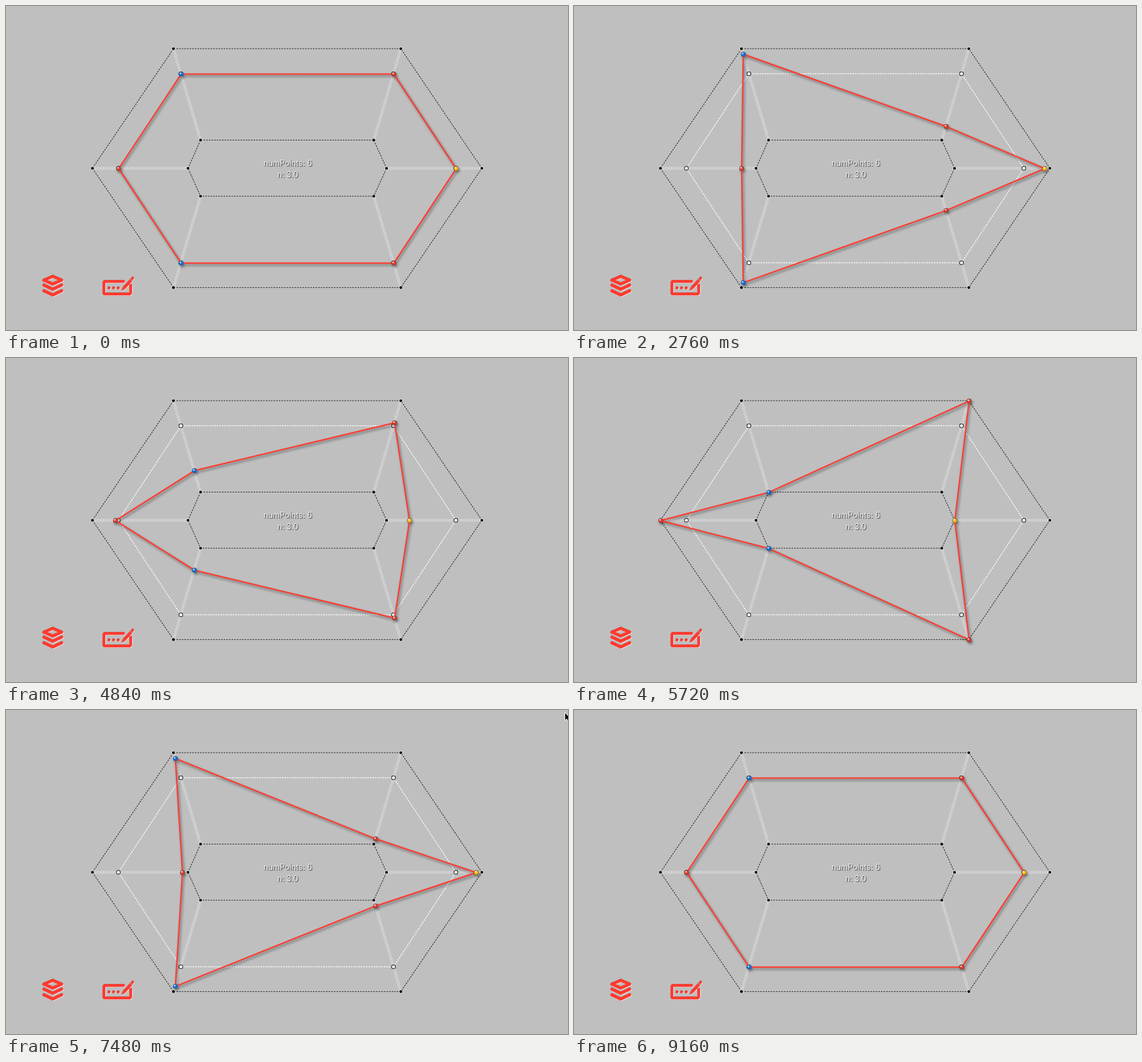
Write an HTML page that moves like this. It is 985x569 px and loops after 9280 ms.

```html
<!DOCTYPE html>
<html lang="en">
<head>
<meta charset="utf-8">
<title>Zig-zag polygon</title>
<style>
  html, body { margin: 0; width: 100%; height: 100%; overflow: hidden; background: #bfbfbf; }
  svg { display: block; width: 985px; height: 569px; }

  .rays { stroke: #e9e9e9; stroke-width: 5; stroke-dasharray: 1 2; fill: none; }
  .bounds { stroke: #1c1c1c; stroke-width: 1.1; stroke-dasharray: 2.8 1.8; fill: none; }
  .rest { stroke: #fff; stroke-width: 1.5; stroke-dasharray: 2.6 1.8; fill: none; }
  .pins { fill: #000; stroke: #ececec; stroke-width: 1; }
  .holes { fill: #fff; stroke: #333; stroke-width: 1.3; }

  .shape { translate: .5px .5px; filter: drop-shadow(2.5px 3.5px 2.2px rgba(0, 0, 0, .46)); }
  .line {
    fill: none; stroke: #fb3d32; stroke-width: 2.5; stroke-linejoin: round;
    animation: line 9280ms infinite;
  }
  .even { animation: even 9280ms infinite; }
  .odd { animation: odd 9280ms infinite; }
  .line, .even, .odd { animation-timing-function: ease-out; }
  .red { color: #e23a2d; }
  .blue { color: #0b73e6; }
  .gold { color: #ffb60a; }

  /* rest, zig, zag, zig, rest */
  @keyframes line {
    0%, 15.89%, 93.86%, 100% { d: path("M788.5 285L679.2 119L306.5 119L197 285L306.5 451L679.2 451Z"); }
    38.79%, 38.94%, 85.1% { d: path("M834 285L644.5 235.5L293.5 75L319 285L293.5 494.5L644.5 334Z"); }
    61.91%, 62.31% { d: path("M667 285L692 75L341 235.5L151.5 285L341 334L692 494.5Z"); }
  }
  @keyframes even {
    0%, 15.89%, 93.86%, 100% { translate: var(--rest); }
    38.79%, 38.94%, 85.1% { translate: var(--out); }
    61.91%, 62.31% { translate: var(--in); }
  }
  @keyframes odd {
    0%, 15.89%, 93.86%, 100% { translate: var(--rest); }
    38.79%, 38.94%, 85.1% { translate: var(--in); }
    61.91%, 62.31% { translate: var(--out); }
  }

  .v0 { --in: 667px 285px; --rest: 788.5px 285px; --out: 834px 285px; }
  .v1 { --in: 644.5px 235.5px; --rest: 679.2px 119px; --out: 692px 75px; }
  .v2 { --in: 341px 235.5px; --rest: 306.5px 119px; --out: 293.5px 75px; }
  .v3 { --in: 319px 285px; --rest: 197px 285px; --out: 151.5px 285px; }
  .v4 { --in: 341px 334px; --rest: 306.5px 451px; --out: 293.5px 494.5px; }
  .v5 { --in: 644.5px 334px; --rest: 679.2px 451px; --out: 692px 494.5px; }
  .pins .a { translate: var(--in); }
  .pins .b { translate: var(--out); }
  .holes circle { translate: var(--rest); }

  text {
    font: 13.8px Inter, Roboto, sans-serif; fill: #f4f4f4; text-anchor: middle;
    text-shadow: 1px 1.2px 1px rgba(0, 0, 0, .75);
  }
  .icons { filter: drop-shadow(1px 1px 0 #f0f0f0) drop-shadow(.8px .8px .6px rgba(0, 0, 0, .55)); }
  .cursor { animation: cursor 9280ms infinite; }
  @keyframes cursor {
    0%, 79.3% { translate: 988px 9px; }
    80.4%, 83.2% { translate: 979.5px 4.5px; }
    84.6%, 100% { translate: 990px -20px; }
  }
</style>
</head>
<body>
<svg viewBox="0 0 985 569">
  <defs>
    <g id="ball">
      <circle r="4" fill="currentColor" stroke="#444" stroke-opacity=".75" stroke-width=".9"/>
      <circle cx="-1.2" cy="-1.3" r="1.4" fill="#fff" fill-opacity=".8"/>
    </g>
  </defs>

  <path class="rays" d="M667 285H834M644.5 235.5L692 75M341 235.5L293.5 75M319 285H151.5M341 334L293.5 494.5M644.5 334L692 494.5"/>
  <path class="bounds" d="M834 285L692 75H293.5L151.5 285L293.5 494.5H692Z"/>
  <path class="bounds" d="M667 285L644.5 235.5H341L319 285L341 334H644.5Z"/>
  <path class="rest" d="M788.5 285L679.2 119H306.5L197 285L306.5 451H679.2Z"/>

  <g class="pins">
    <circle class="a v0" r="3"/><circle class="a v1" r="3"/><circle class="a v2" r="3"/>
    <circle class="a v3" r="3"/><circle class="a v4" r="3"/><circle class="a v5" r="3"/>
    <circle class="b v0" r="3"/><circle class="b v1" r="3"/><circle class="b v2" r="3"/>
    <circle class="b v3" r="3"/><circle class="b v4" r="3"/><circle class="b v5" r="3"/>
  </g>
  <g class="holes">
    <circle class="v0" r="3.4"/><circle class="v1" r="3.4"/><circle class="v2" r="3.4"/>
    <circle class="v3" r="3.4"/><circle class="v4" r="3.4"/><circle class="v5" r="3.4"/>
  </g>

  <text x="494" y="281">numPoints: 6</text>
  <text x="494" y="301">n: 3.0</text>

  <g class="shape">
    <path class="line" d="M788.5 285L679.2 119L306.5 119L197 285L306.5 451L679.2 451Z"/>
    <g class="even v0 gold"><use href="#ball"/></g>
    <g class="odd v1 red"><use href="#ball"/></g>
    <g class="even v2 blue"><use href="#ball"/></g>
    <g class="odd v3 red"><use href="#ball"/></g>
    <g class="even v4 blue"><use href="#ball"/></g>
    <g class="odd v5 red"><use href="#ball"/></g>
  </g>

  <g class="icons" fill="none" stroke="#ff3b30" stroke-linejoin="round" stroke-linecap="round">
    <path stroke-width="5.4" d="M82 474.8L97.6 481.5L82 488.2L66.4 481.5Z"/>
    <path stroke-width="5.6" d="M66.6 490.2L82 497.6L97.4 490.2M66.6 500.2L82 507.6L97.4 500.2"/>
    <path stroke-width="5" d="M206 483.7H174.5Q171.6 483.7 171.6 486.6V503Q171.6 505.8 174.5 505.8H215.6Q218.5 505.8 218.5 503V490.5"/>
    <path stroke-width="5.6" stroke-linecap="butt" d="M206.6 495.4L219.3 481.6"/>
    <path stroke="none" fill="#ff3b30" d="M204.3 493.8L208.6 497.8L202.4 499.6ZM217.8 479.2L221.2 475.6Q222.4 474.6 223.8 476T224.4 478.6L221.6 482Z"/>
    <g stroke="none" fill="#ff3b30">
      <circle cx="180.5" cy="495" r="2.6"/><circle cx="188.6" cy="495" r="2.6"/><circle cx="196.7" cy="495" r="2.6"/>
    </g>
  </g>

  <path class="cursor" fill="#000" stroke="#fff" stroke-width="1" d="M0 0V14L3.2 11L5.6 16.2L8 15.1L5.7 10.3H10Z"/>
</svg>
</body>
</html>
```
